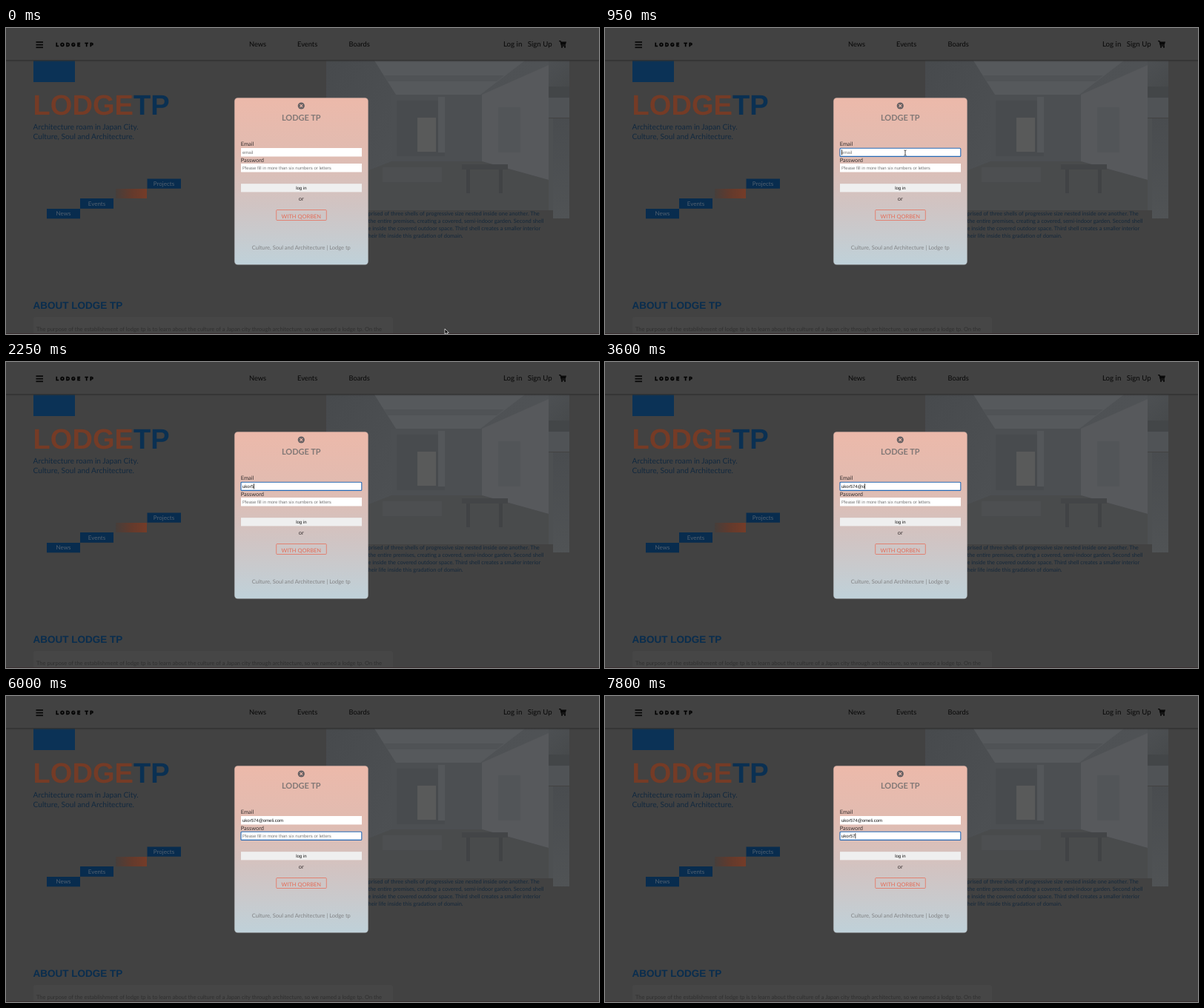
Recreate the animation shown at these times as an HTML page with a canvas. Size 800 by 413 pixels, loop 8 s.

```html
<!DOCTYPE html>
<html lang="en">
<head>
<meta charset="utf-8">
<title>Login form</title>
<style>
  html, body { margin: 0; width: 100%; height: 100%; overflow: hidden; background: #424242; }
  canvas, svg { position: absolute; left: 0; top: 0; width: 800px; height: 413px; display: block; }
  text { font-family: Lato, sans-serif; text-rendering: geometricPrecision; white-space: pre; }
  .sans text, text.sans { font-family: "Liberation Sans", Arial, sans-serif; }
  .mid { text-anchor: middle; }
  .bold { font-weight: 700; }
  .nav { font-size: 9.3px; fill: #080808; }
  .lead { font-size: 10.2px; fill: #12293f; }
  .step { font-size: 8px; fill: #526170; }
  .para { font-size: 7.45px; fill: #14283b; }
  .label { font-size: 7.4px; fill: #332d2d; }
  .field { font-size: 6px; fill: #111; }
  .hint { font-size: 6px; fill: #777; }
  .sans text.option { font: 600 5.6px Inter, sans-serif; fill: #333; }
</style>
</head>
<body>
<canvas id="page" width="800" height="413"></canvas>
<svg viewBox="0 0 800 413">
  <defs>
    <linearGradient id="card" x1="0" y1="0" x2="0" y2="1">
      <stop offset="0" stop-color="#ecb9aa"/>
      <stop offset=".3" stop-color="#e2bbb0"/>
      <stop offset=".65" stop-color="#d0c4c3"/>
      <stop offset="1" stop-color="#bfd1d9"/>
    </linearGradient>
    <filter id="shade" x="-5%" y="-20%" width="110%" height="150%">
      <feDropShadow dx="0" dy="1" stdDeviation="1" flood-opacity=".35"/>
    </filter>
  </defs>

  <text x="67.2" y="24.6" stroke="#000" stroke-width=".25" style="font:900 7px Inter,sans-serif;letter-spacing:2.3px">LODGE TP</text>
  <g class="nav">
    <text x="328" y="25">News</text>
    <text x="393" y="25">Events</text>
    <text x="462.5" y="25">Boards</text>
    <text x="671" y="25" font-size="9.7">Log in</text>
    <text x="703.7" y="25" font-size="9.7">Sign Up</text>
  </g>

  <text class="sans bold" x="36.5" y="117.2" font-size="38.1" fill="#753b26">LODGE<tspan fill="#0a3052">TP</tspan></text>
  <g class="lead">
    <text x="36.5" y="136.5">Architecture roam in Japan City.</text>
    <text x="36.5" y="150.3">Culture, Soul and Architecture.</text>
  </g>
  <g class="step mid">
    <text x="77.5" y="253.3">News</text>
    <text x="122.5" y="239.5">Events</text>
    <text x="213" y="212.6">Projects</text>
  </g>
  <g class="para">
    <text x="488.5" y="253.3">prised of three shells of progressive size nested inside one another. The</text>
    <text x="488.5" y="263.2">the entire premises, creating a covered, semi-indoor garden. Second shell</text>
    <text x="488.5" y="273.2">e inside the covered outdoor space. Third shell creates a smaller interior</text>
    <text x="488.5" y="283.1">heir life inside this gradation of domain.</text>
  </g>
  <text class="sans bold" x="36.5" y="379.2" font-size="13.5" fill="#092d4e">ABOUT LODGE TP</text>
  <text x="41" y="409.4" font-size="7.5" fill="#2f2f2f">The purpose of the establishment of lodge tp is to learn about the culture of a Japan city through architecture, so we named a lodge tp. On the</text>

  <rect x="308.2" y="94.2" width="180.5" height="225.4" rx="4.5" fill="url(#card)" stroke="#807a78" stroke-opacity=".5" stroke-width=".7"/>
  <circle cx="398.3" cy="105" r="4.6" fill="#676163"/>
  <path d="M396.5 103.2l3.6 3.6m0-3.6l-3.6 3.6" stroke="#ecb9aa" stroke-width="1.2"/>
  <text class="mid bold" x="398.3" y="125.2" font-size="11" fill="#827876">LODGE TP</text>
  <text class="label" x="316.8" y="159.4">Email</text>
  <text class="label" x="316.8" y="180.6">Password</text>
  <rect x="317" y="210.2" width="163" height="11.2" fill="#efefef"/>
  <text class="field sans mid" x="398.3" y="217.9">log in</text>
  <text class="label mid" x="398.3" y="233.4">or</text>
  <rect x="364.7" y="245.5" width="67.6" height="14" rx="1" fill="none" stroke="#e8705c" stroke-width=".8"/>
  <text class="mid" x="398.3" y="257" font-size="7.5" fill="#e56a55">WITH QORBEN</text>
  <text class="mid" x="398.3" y="299" font-size="7.5" fill="#828385">Culture, Soul and Architecture | Lodge tp</text>

  <g id="pass" class="sans"></g>
  <g id="email" class="sans"></g>
  <g id="arrow">
    <path d="M0 0V7.2L1.7 5.7 2.8 8.2 4 7.7 2.9 5.3H5.2Z" fill="#000" stroke="#fff" stroke-width=".7"/>
  </g>
  <path id="beam" d="M-1.6-3.6Q0-3.6 0-2.6Q0-3.6 1.6-3.6M0-2.6V2.6M-1.6 3.6Q0 3.6 0 2.6Q0 3.6 1.6 3.6" fill="none" stroke="#222" stroke-width=".8"/>
</svg>

<script>
const LOOP = 8000;
const $ = id => document.getElementById(id);
const ctx = $('page').getContext('2d');

function box(color, x, y, w, h) {
  ctx.fillStyle = color;
  ctx.fillRect(x, y, w, h);
}

function shape(color, ...p) {
  ctx.fillStyle = color;
  ctx.beginPath();
  for (let i = 0; i < p.length; i += 2) ctx.lineTo(p[i], p[i + 1]);
  ctx.fill();
}

function ramp(x0, y0, x1, y1, ...colors) {
  const g = ctx.createLinearGradient(x0, y0, x1, y1);
  colors.forEach((c, i) => g.addColorStop(i / (colors.length - 1), c));
  return g;
}

function drawRoom() {
  box(ramp(432, 44, 732, 200, '#474a4d', '#4e5154', '#505356'), 432, 44, 300, 202);
  shape('#56595c', 497, 44, 700, 44, 640, 90, 526, 90);
  shape('#505356', 510, 64, 672, 64, 662, 72, 515, 72);
  box('#4c4f52', 520, 90, 122, 92);
  box('#484b4e', 527, 98, 65, 75);
  box('#595a5a', 555, 121, 25, 46);
  box('#54575a', 583, 93, 9, 75);
  shape('#57595c', 642, 90, 732, 50, 732, 205, 642, 180);
  box('#525558', 664, 107, 30, 61);
  shape('#494b4c', 432, 215, 520, 180, 642, 180, 732, 205, 732, 246, 432, 246);
  box('#434547', 615, 184, 62, 7);
  box('#414345', 621, 191, 5, 32);
  box('#414345', 665, 191, 5, 32);
  box('#4d4f51', 508, 188, 80, 20);
  box(ramp(732, 44, 760, 78, '#4d5053', '#474a4c'), 732, 44, 28, 35);
  box('#434648', 732, 79, 28, 15);
  box('#505356', 732, 94, 28, 27);
  box(ramp(732, 122, 760, 257, '#494c4f', '#505355'), 738, 122, 22, 135);
  box('#4d5052', 732, 122, 6, 124);
}

function drawCart() {
  ctx.strokeStyle = '#080808';
  ctx.lineWidth = 1.3;
  ctx.beginPath();
  ctx.moveTo(746, 17.7);
  ctx.lineTo(748, 17.7);
  ctx.lineTo(749.6, 24);
  ctx.lineTo(755, 24);
  ctx.stroke();
  shape('#080808', 748, 18.6, 756, 18.6, 754.8, 22.8, 749, 22.8);
  for (const x of [750, 754]) {
    ctx.beginPath();
    ctx.arc(x, 25.8, 1.1, 0, 7);
    ctx.fill();
  }
}

function drawPage() {
  box('#424242', 0, 0, 800, 413);
  drawRoom();
  box('#0b3256', 37, 17, 56, 56);
  box('#082c4e', 55, 244, 45, 13.3);
  box('#082c4e', 100, 230, 45, 13.8);
  box(ramp(148, 0, 190, 0, '#463e3b', '#633a2c', '#753c28'), 148, 217, 42, 13);
  box('#082c4e', 190.5, 203.5, 45.5, 13.2);
  ctx.fillStyle = '#464646';
  ctx.beginPath();
  ctx.roundRect(37, 390, 485, 40, 3);
  ctx.fill();
  box('#3a2f30', 0, 412, 800, 1);
  box('#424242', 0, 0, 800, 44);
  box(ramp(0, 43, 0, 46, '#303030', 'rgba(48,48,48,0)'), 0, 43, 800, 3);
  for (const y of [18.2, 21.8, 25.4]) box('#080808', 40.5, y, 9.5, 1.7);
  drawCart();
}

// An input with placeholder, focus ring, caret and a list of suggestions
function makeField(id, y, hint, options) {
  const h = 17 + 16.5 * (options.length - 1) + 6;
  const rows = options.map((s, i) =>
    `<text class="option" x="322" y="${y + 25.4 + 16.5 * i}">${s}</text>`).join('');
  const g = $(id);
  g.innerHTML = `
    <rect x="317" y="${y}" width="163" height="11.5" fill="#fff"/>
    <rect x="317" y="${y + .2}" width="162.8" height="11.2" rx="1" fill="none" stroke="#2468b4" stroke-width="1.1"/>
    <text class="hint" x="319" y="${y + 7.8}">${hint}</text>
    <text class="field" x="319" y="${y + 7.8}"></text>
    <rect y="${y + 2.2}" width=".8" height="7.2" fill="#111"/>
    <g><rect x="316.7" y="${y + 11.7}" width="163.4" height="${h}" rx="1" fill="#fff" filter="url(#shade)"/>${rows}</g>`;
  const [, ring, ghost, value, caret, list] = g.children;
  return { ring, ghost, value, caret, list };
}

const show = (el, on) => { el.style.display = on ? '' : 'none'; };
const within = (t, [a, b]) => t >= a && t < b;

function updateField(f, t) {
  const n = f.times.filter(k => t >= k).length;
  const focused = within(t, f.focus);
  f.value.textContent = f.text.slice(0, n);
  show(f.ghost, n === 0);
  show(f.ring, focused);
  show(f.list, within(t, f.open));
  show(f.caret, focused && !f.blink.some(b => within(t, b)));
  f.caret.setAttribute('x', 319.1 + (n ? f.value.getComputedTextLength() : 0));
}

const fields = [
  Object.assign(makeField('email', 162, 'email', ['ukorukor@omeli.com', 'ukor@omeli.com']), {
    text: 'ukor574@omeli.com',
    times: [1350, 1500, 1700, 1750, 2100, 2400, 2500, 3250, 3600, 4050, 4100, 4250, 4450, 4650, 4950, 5050, 5250],
    focus: [750, 5950], open: [1350, 2250], blink: [[2750, 3250], [5450, 5950]]
  }),
  Object.assign(makeField('pass', 183, 'Please fill in more than six numbers or letters', ['ukorukor']), {
    text: 'ukor57',
    times: [6500, 6650, 6950, 7000, 7700, 7800],
    focus: [6000, LOOP], open: [6500, 7800], blink: [[6000, 6500], [7150, 7700]]
  })
];

// Pointer path as [time, x, y]
const path = [[170, 592, 406], [300, 545, 308], [430, 455, 140], [510, 424, 104], [620, 409, 138], [720, 405, 168.5]];

function pointer(t) {
  if (t <= path[0][0]) return path[0].slice(1);
  const i = path.findIndex(p => t < p[0]);
  if (i < 0) return path[path.length - 1].slice(1);
  const [t0, x0, y0] = path[i - 1], [t1, x1, y1] = path[i];
  const k = (t - t0) / (t1 - t0);
  return [x0 + (x1 - x0) * k, y0 + (y1 - y0) * k];
}

function updatePointer(t) {
  const [x, y] = pointer(t);
  const typing = y > 162 && y < 174 && x > 317 && x < 480;
  show($('arrow'), t < 1350 && !typing);
  show($('beam'), t < 1350 && typing);
  for (const id of ['arrow', 'beam']) $(id).setAttribute('transform', `translate(${x} ${y})`);
}

function frame() {
  const t = performance.now() % LOOP;
  fields.forEach(f => updateField(f, t));
  updatePointer(t);
  requestAnimationFrame(frame);
}

drawPage();
frame();
</script>
</body>
</html>
```
